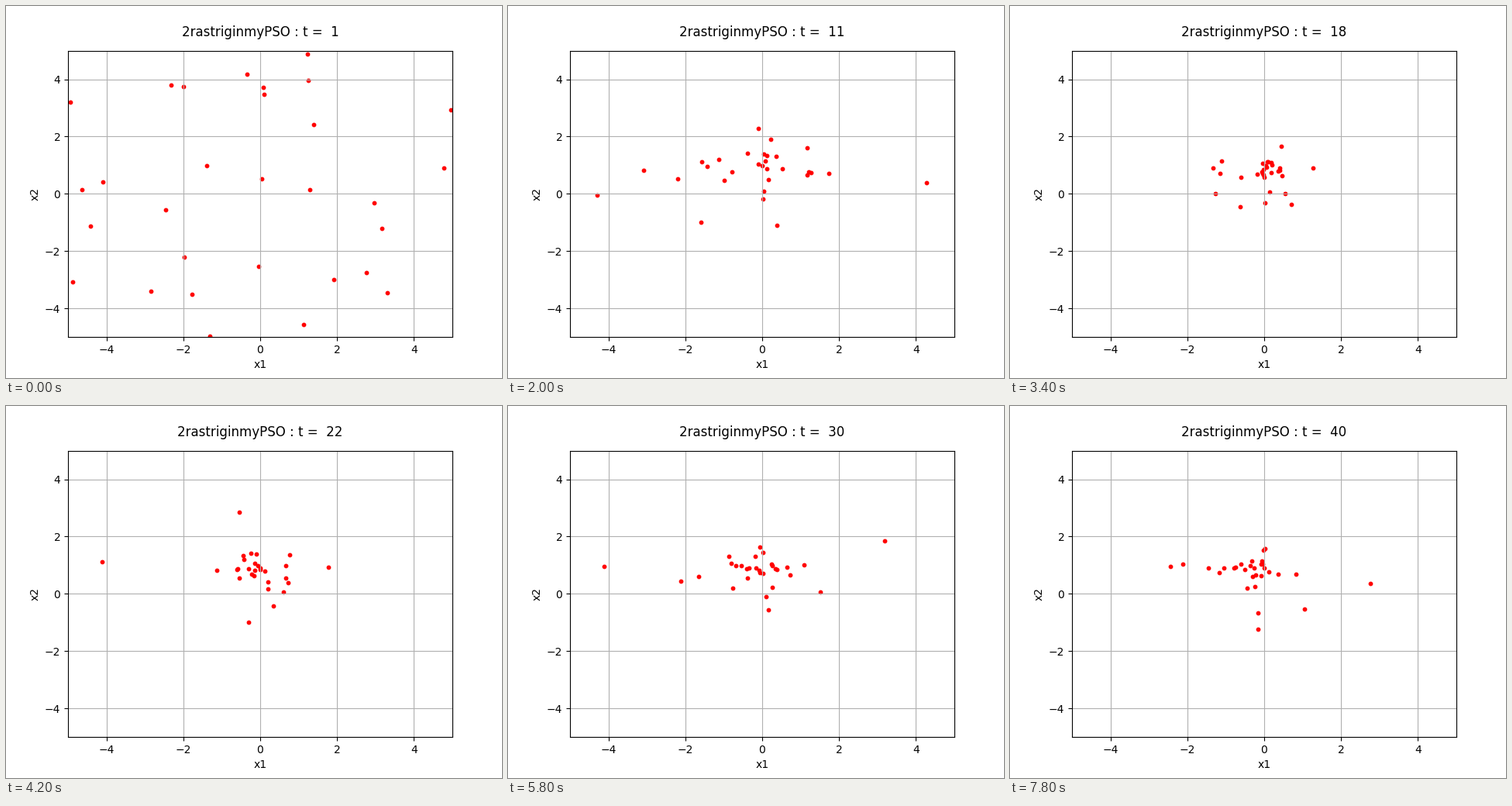
A matplotlib script for the animation above (8 s loop, 640 by 480 pixels).

```python
import numpy as np
import matplotlib.pyplot as plt
from matplotlib.animation import FuncAnimation

STEPS, COUNT, LIMIT = 40, 30, 5
INERTIA, PULL = 0.5, 1.8
BEST = (0, 0.9)


def run_swarm(seed=7):
    """Particle positions for every step, shape (STEPS, COUNT, 2)."""
    rng = np.random.default_rng(seed)
    pos = rng.uniform(-LIMIT, LIMIT, (COUNT, 2))
    vel = np.zeros_like(pos)
    # each particle swings between its own best spot and the shared one
    own = rng.normal((0, 0.7), (1.2, 0.9), (COUNT, 2))
    track = [pos]
    for _ in range(STEPS - 1):
        r1, r2 = rng.random((2, COUNT, 2))
        vel = INERTIA * vel + PULL * (r1 * (own - pos) + r2 * (BEST - pos))
        pos = pos + vel
        track.append(pos)
    return np.array(track)


track = run_swarm()

fig, ax = plt.subplots(figsize=(6.4, 4.8), dpi=100)
ax.set(xlim=(-LIMIT, LIMIT), ylim=(-LIMIT, LIMIT), xlabel="x1", ylabel="x2")
ax.grid(True)
dots = ax.scatter(*track[0].T, s=10, c="red")
title = ax.text(0.5, 1.05, "", ha="center", fontsize=12, transform=ax.transAxes)


def draw(i):
    dots.set_offsets(track[i])
    title.set_text(f"2rastriginmyPSO : t =  {i + 1}")
    return dots, title


anim = FuncAnimation(fig, draw, frames=STEPS, interval=200, repeat=True)
plt.show()
```
